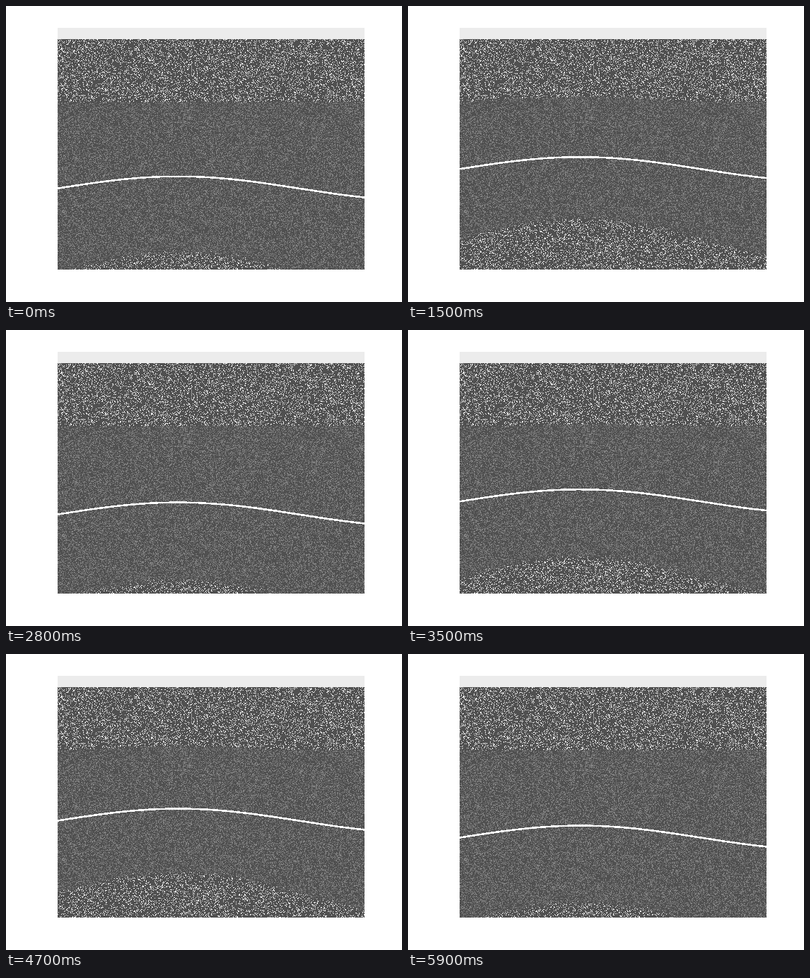
Write a matplotlib script that moves like this. It is 560 px wide and 420 px high and loops after 6000 ms.

```python
import numpy as np
import matplotlib.pyplot as plt
from matplotlib.animation import FuncAnimation

W, H, DPI = 560, 420, 100
LEFT, RIGHT, TOP, BOTTOM = 73, 507, 31, 374
SURFACE = 47
FRAMES, INTERVAL = 60, 100
AMP = 17

AIR, DARK, GREY, LIGHT = 236, 80, 132, 240

cols = np.arange(LEFT, RIGHT) + 0.5
rows = (np.arange(TOP, BOTTOM) + 0.5)[:, None]

# The grain stays put while the layers move through it.
rng = np.random.default_rng(7)
grain = rng.random((BOTTOM - TOP, RIGHT - LEFT))
fuzz = rng.normal(size=grain.shape)
speckled = np.where(grain < 0.165, LIGHT, DARK)
muted = np.where(grain < 0.29, GREY, DARK)


def wave(x, i):
    """Height of the interface: a fixed sine that bobs twice per loop."""
    phase = 2 * np.pi * (i / 30 + 0.1)
    return 245 + AMP * np.cos(phase) - AMP * np.sin(4 * (x - LEFT) / (RIGHT - LEFT))


def layers(i):
    h = wave(cols, i)
    upper = np.minimum(136, 128 + 0.4 * (h - 213))
    lower = 1.78 * h - 80
    outer = (rows + 0.8 * fuzz < upper) | (rows + 2.5 * fuzz > lower)
    img = np.where(outer, speckled, muted)
    img[:SURFACE - TOP] = AIR
    return img


fig = plt.figure(figsize=(W / DPI, H / DPI), dpi=DPI, facecolor="white")
ax = fig.add_axes([0, 0, 1, 1])
ax.axis("off")

field = ax.imshow(layers(0), cmap="gray", vmin=0, vmax=255, aspect="auto",
                  extent=(LEFT, RIGHT, BOTTOM, TOP), interpolation="nearest")
xs = np.linspace(LEFT, RIGHT, 218)
line, = ax.plot(xs, wave(xs, 0), color="white", lw=1.5 * 72 / DPI,
                solid_capstyle="butt", antialiased=False)
ax.set_xlim(0, W)
ax.set_ylim(H, 0)


def draw(i):
    field.set_data(layers(i))
    line.set_ydata(wave(xs, i))
    return field, line


anim = FuncAnimation(fig, draw, frames=FRAMES, interval=INTERVAL, repeat=True)
plt.show()
```
